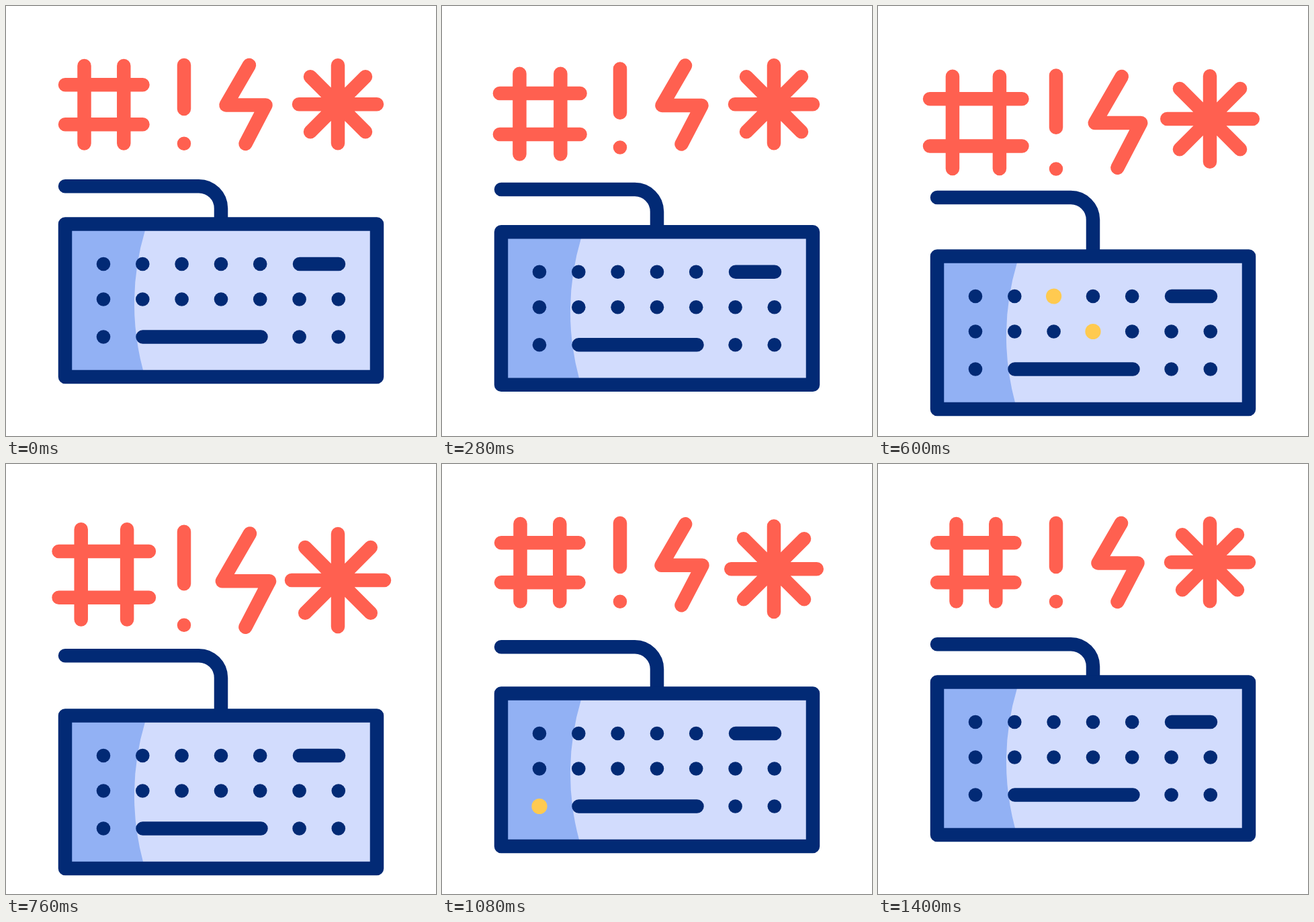
Write an HTML page that moves like this. It is 640 px wide and 640 px high and loops after 1.44 s.

```html
<!DOCTYPE html>
<html lang="en">
<head>
<meta charset="utf-8">
<title>Keyboard</title>
<style>
html, body { margin: 0; height: 100%; overflow: hidden; background: #fff; }
svg { display: block; width: 100%; height: 100%; }
path { fill: none; stroke-width: 20.5; stroke-linecap: round; stroke-linejoin: round; }
#glyphs path { stroke: #ff6050; }
.navy { stroke: #022a75; }
</style>
</head>
<body>
<svg viewBox="0 0 640 640">
  <g id="glyphs">
    <path d="M88 117.3H203.5M88 176.2H203.5M116.5 89V204.5M175.3 89V204.5"/>
    <path d="M265 88V153M265 204.8h0"/>
    <path d="M362 88L327.5 147.5H386.5L356.5 205"/>
    <path d="M436 146.3H552M494 88.3V204.3M453 105.3L535 187.3M535 105.3L453 187.3"/>
  </g>
  <path id="cable" class="navy"/>
  <g id="board">
    <rect x="88" y="324" width="464" height="228" fill="#d2dcfd"/>
    <path d="M88 334H207A380 380 0 0 0 204 542H88Z" style="fill:#92b1f4"/>
    <path class="navy" d="M88 324.4H552V552H88ZM437 384H495M203.5 492.5H379.5"/>
    <g id="keys"></g>
  </g>
</svg>
<script>
const LOOP = 1440, STEP = 40, STAGGER = 80, STROKE = 20.5;
const $ = id => document.getElementById(id);

const ease = (t, from, to) => {
  const u = Math.min(1, Math.max(0, (t - from) / (to - from)));
  return u * u * (3 - 2 * u);
};
// Rises from a to b, holds, then falls from c to d.
const swing = (t, a, b, c, d) => ease(t, a, b) - ease(t, c, d);

const glyphs = [...$("glyphs").children];
const centres = [[145.8, 146.7], [265, 146.5], [357, 146.5], [494, 146.3]];

const columns = [145, 203.3, 261.6, 320, 378.2, 436.6, 494.8];
const rows = [[384, [0, 1, 2, 3, 4]], [436.5, [0, 1, 2, 3, 4, 5, 6]], [492.5, [0, 5, 6]]];
// Moment at which each lit key starts to glow, by "row,column".
const presses = { "2,6": 360, "0,2": 520, "1,3": 560, "0,4": 880, "2,0": 1040 };
const GLOW = 120;

const keys = rows.flatMap(([y, filled], row) => filled.map(col => {
  const dot = document.createElementNS("http://www.w3.org/2000/svg", "circle");
  dot.setAttribute("cx", columns[col]);
  dot.setAttribute("cy", y);
  $("keys").append(dot);
  return { dot, start: presses[row + "," + col] };
}));

function draw(t) {
  glyphs.forEach((glyph, i) => {
    const local = t - i * STAGGER;
    const drop = 26.6 * swing(local, 90, 460, 600, 1010);
    const scale = 1 + 0.19 * swing(local, 185, 525, 685, 1005);
    const [x, y] = centres[i];
    glyph.setAttribute("transform",
      `translate(${x} ${y + drop}) scale(${scale}) translate(${-x} ${-y})`);
    glyph.style.strokeWidth = STROKE / scale;
  });

  const sink = 50 * swing(t, 102, 668, 788, 1268);
  const sag = 17 * swing(t, 90, 630, 775, 1221);
  $("board").setAttribute("transform", `translate(0 ${sink})`);
  $("cable").setAttribute("d",
    `M88 ${268.2 + sag}H287a33 33 0 0 1 33 33V${324.4 + sink}`);

  for (const { dot, start } of keys) {
    const lit = t >= start && t < start + GLOW;
    dot.setAttribute("r", lit ? 11.6 : 10.3);
    dot.setAttribute("fill", lit ? "#ffca50" : "#022a75");
  }
}

function tick() {
  draw(Math.floor(performance.now() % LOOP / STEP) * STEP);
  requestAnimationFrame(tick);
}
tick();
</script>
</body>
</html>
```
